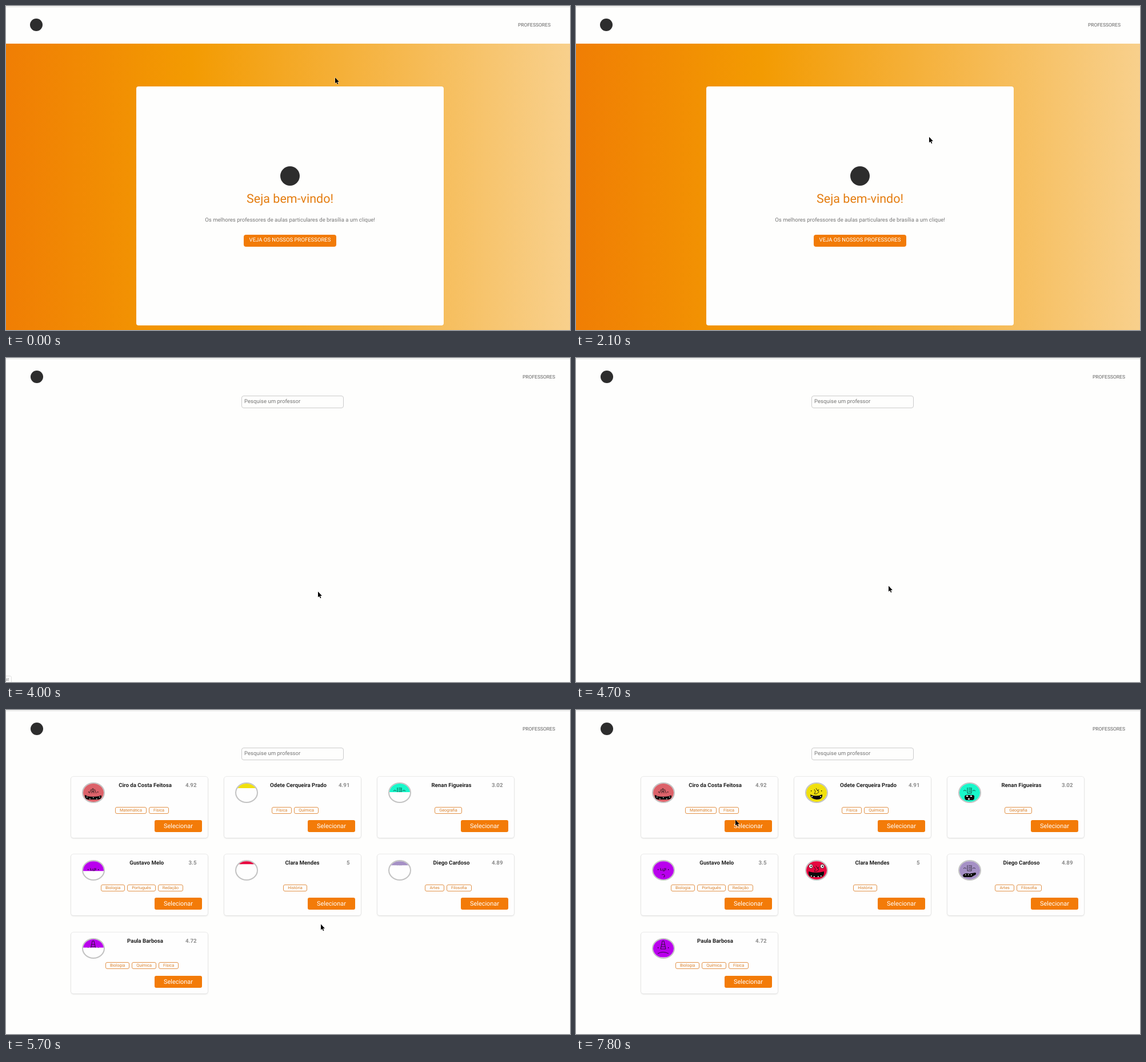
Write an HTML page that moves like this. It is 987 by 568 pixels and loops after 8000 ms.

```html
<!DOCTYPE html>
<html lang="pt-BR">
<head>
<meta charset="utf-8">
<title>Professores</title>
<style>
  html, body { margin: 0; width: 100%; height: 100%; overflow: hidden; }
  body {
    position: relative; background: #fefefd;
    font: 9.57px/12px Roboto, sans-serif; white-space: nowrap;
    text-rendering: geometricPrecision;
  }
  #home, #list, #cards { position: absolute; inset: 0; }
  #home, #list, #cards, #status, #cursor, #arrow, #hand, .avatar, .avatar svg {
    animation: 8s step-end infinite;
  }
  .abs, .nav, .logo, .card, .tags, .select, #cursor, #status { position: absolute; }

  .line { left: 0; right: 0; top: 1px; height: 1px; background: #dedede; }
  .logo { border-radius: 50%; background: #2d2d2d; }
  .small { width: 22px; height: 22px; top: 22px; }
  .nav { top: 28px; font-size: 8.5px; color: #606060; }

  #home { animation-name: home; }
  .sky {
    left: 0; right: 0; top: 66px; bottom: 0;
    background: linear-gradient(90deg, #f07e04, #f39b02 33%, #f8d08c);
  }
  .welcome {
    left: 228px; top: 141px; width: 538px; height: 419px; border-radius: 4px;
    background: #fefefd; box-shadow: 0 0 1px #c7822866; text-align: center;
  }
  .welcome .logo { left: 252px; top: 140px; width: 34px; height: 34px; }
  h1 {
    left: 0; right: 0; top: 183.5px; margin: 0;
    font: 400 21.5px/28px Roboto, sans-serif; color: #e47d10;
  }
  .lead { left: 0; right: 0; top: 229px; color: #777; }
  .go {
    left: 188px; top: 260px; width: 162px; border-radius: 4px;
    font-size: 9.53px; line-height: 20.5px; color: #fff; background: #f27b07;
  }

  #list { animation-name: list; background: #fefefd; }
  #cards { animation-name: cards; }
  .search {
    left: 411.5px; top: 66px; width: 173px; height: 20px; padding-left: 4.5px;
    border: 1px solid #cbcbcb; border-radius: 4px; line-height: 20px; color: #757575;
  }
  .card {
    width: 238.5px; height: 107px; border-radius: 4px; background: #fefefe;
    box-shadow: 0 0 0 .6px #dcdcdc, 0 1px 3px #0002;
  }
  .head {
    display: flex; justify-content: space-between; align-items: flex-start;
    padding: 10px 19px 0; font-size: 9.7px; line-height: 11px; font-weight: 700;
  }
  .name { color: #222; }
  .rating { color: #8c8c8c; }
  .avatar {
    width: 36px; height: 32px; border: 2px solid #c3c3c3; border-radius: 50%;
    overflow: hidden; background: #fefefe;
  }
  .avatar svg { display: block; animation-name: fill; }
  .tags {
    left: 4.75px; top: 52.6px; width: 100%;
    display: flex; justify-content: center; gap: 4px;
  }
  .tags span {
    padding: 0 7px; border: 1px solid #e2934a; border-radius: 3px;
    font-size: 7.3px; line-height: 10px; color: #d97f28;
  }
  .select {
    left: 146px; top: 76px; width: 83px; border-radius: 3px; text-align: center;
    font-size: 10.9px; line-height: 21px; color: #fff; background: #f37b08;
  }

  #status {
    left: -1px; bottom: -1px; width: 9px; height: 10px; overflow: hidden;
    border: 1px solid #d4d4d4; border-radius: 0 3px 0 0; background: #fefefe;
    font-size: 7.5px; line-height: 12px; text-indent: -1px; color: #555;
    animation-name: status;
  }
  #cursor { left: 0; top: 0; overflow: visible; animation-name: move; }
  #cursor path { stroke: #fff; stroke-width: .7; paint-order: stroke; }
  #arrow { animation-name: arrow; }
  #hand { animation-name: hand; }

  @keyframes home { 0% { opacity: 1 } 50%, 100% { opacity: 0 } }
  @keyframes list { 0% { opacity: 0 } 50%, 100% { opacity: 1 } }
  @keyframes cards { 0% { opacity: 0 } 61.25%, 100% { opacity: 1 } }
  @keyframes arrow { 0% { opacity: 1 } 36.25% { opacity: 0 } 50%, 100% { opacity: 1 } }
  @keyframes hand { 0% { opacity: 0 } 36.25% { opacity: 1 } 50%, 100% { opacity: 0 } }
  @keyframes status {
    0% { opacity: 0 } 40% { opacity: .7 } 43.75% { opacity: 1 }
    50% { opacity: .7 } 51.25% { opacity: .4 } 52.5%, 100% { opacity: 0 }
  }
  @keyframes load1 { 0% { width: 0; border-radius: 1px } 62.5%, 100% { width: 36px; border-radius: 50% } }
  @keyframes load2 { 0% { width: 0; border-radius: 1px } 68.75%, 100% { width: 36px; border-radius: 50% } }
  @keyframes load3 { 0% { width: 0; border-radius: 1px } 70%, 100% { width: 36px; border-radius: 50% } }
  @keyframes load4 { 0% { width: 0; border-radius: 1px } 71.25%, 100% { width: 36px; border-radius: 50% } }
  @keyframes fill {
    0% { clip-path: inset(0 0 calc(32px - var(--part)) 0) }
    73.75% { clip-path: inset(0 0 calc(16px - var(--part) / 2) 0) }
    75%, 100% { clip-path: inset(0) }
  }
  @keyframes move {
    0% { transform: translate(576px, 125px) }
    15% { transform: translate(551px, 113px) }
    16.25% { transform: translate(527px, 102px) }
    21.25% { transform: translate(534px, 108px) }
    22.5% { transform: translate(548px, 124px) }
    23.75% { transform: translate(568px, 150px) }
    25% { transform: translate(594px, 187px) }
    26.25% { transform: translate(618px, 229px) }
    27.5% { transform: translate(637px, 274px) }
    28.75% { transform: translate(644px, 318px) }
    30% { transform: translate(622px, 358px) }
    31.25% { transform: translate(583px, 386px) }
    32.5% { transform: translate(574px, 391px) }
    33.75% { transform: translate(568px, 396px) }
    35% { transform: translate(561px, 400px) }
    36.25% { transform: translate(555px, 404px) }
    37.5% { transform: translate(551px, 407px) }
    38.75% { transform: translate(548px, 408px) }
    40% { transform: translate(546px, 409px) }
    57.5% { transform: translate(546px, 405px) }
    58.75% { transform: translate(547px, 399px) }
    60% { transform: translate(548px, 393px) }
    61.25% { transform: translate(548px, 389px) }
    65% { transform: translate(547px, 384px) }
    66.25% { transform: translate(550px, 380px) }
    68.75% { transform: translate(551px, 377px) }
    70% { transform: translate(551px, 375px) }
    86.25% { transform: translate(545px, 392px) }
    87.5% { transform: translate(520px, 408px) }
    88.75% { transform: translate(473px, 403px) }
    90% { transform: translate(420px, 372px) }
    91.25% { transform: translate(370px, 328px) }
    92.5% { transform: translate(331px, 288px) }
    95% { transform: translate(306px, 246px) }
    96.25% { transform: translate(280px, 206px) }
    97.5%, 100% { transform: translate(279px, 192px) }
  }
</style>
</head>
<body>
<div id="home">
  <div class="abs line"></div>
  <div class="logo small" style="left:42px"></div>
  <div class="nav" style="right:34px">PROFESSORES</div>
  <div class="abs sky"></div>
  <div class="abs welcome">
    <div class="logo"></div>
    <h1 class="abs">Seja bem-vindo!</h1>
    <div class="abs lead">Os melhores professores de aulas particulares de brasília a um clique!</div>
    <div class="abs go">VEJA OS NOSSOS PROFESSORES</div>
  </div>
</div>

<div id="list">
  <div class="abs line"></div>
  <div class="logo small" style="left:43px"></div>
  <div class="nav" style="right:26px">PROFESSORES</div>
  <div class="abs search">Pesquise um professor</div>
  <div id="cards"></div>
</div>

<div id="status">st</div>
<svg id="cursor" width="10" height="14">
  <path id="arrow" d="M0 .5V10.6L2.3 8.5 4 12.2 5.4 11.6 3.8 8H6.9Z"/>
  <path id="hand" d="M.3 .3Q1.2-.6 1.9 .5V3.4L5 4Q6.3 4.3 6 6L5.4 9.5H1L-1 6.2Q-1.2 5 .3 5.6Z"/>
</svg>

<script>
  const line = (d, width = .8) => `<path d="${d}" fill="none" stroke="#111" stroke-width="${width}"/>`;
  const shape = (d, color = '#0b0b0b') => `<path d="${d}" fill="${color}"/>`;
  const teeth = d => shape(d, '#fff');
  const dots = (y, gap) => shape(`M${17 - gap} ${y}h1.3v1.5h-1.3zM${17 + gap} ${y}h1.3v1.5h-1.3z`);
  const brows = line('M7 13q2-3 5 0M23 13q2-3 5 0', .7);
  const peak = line('M11 17l3-7M15 17l1-8 2 0 1 8M20 10l3 7M15 14h4');
  const bulb = line('M14 10l2 4-2 4h4M17 8l3 5 2-3M18 18l4-3-2-4');
  const sheet = line('M14 7v10h7V7M16 8h4M16 11h4M16 14h4', .7);
  const grin = shape('M3 20Q5 20 7 22Q17 24 28 22Q31 20 32 21Q33 27 26 28H9Q2 27 3 20Z') +
    teeth('M6 23h1.5v1.2h-1.5zM11 26h1.5v1.2h-1.5zM17 24h1.5v1.2h-1.5zM23 26h1.5v1.2h-1.5zM28 23h1.5v1.2h-1.5z');
  const eye = (x, y) => `<circle cx="${x}" cy="${y}" r="3.4" fill="#fff" stroke="#111" stroke-width=".7"/>
    <circle cx="${x + .5}" cy="${y}" r="1.2"/>`;

  const faces = [
    dots(14, 8) + peak + grin,
    dots(12, 9) + bulb + shape('M7 19Q17 24 28 19Q29 28 18 28Q7 27 7 19Z') + teeth('M9 22h2v1.5h-2zM24 22h2v1.5h-2z'),
    brows + sheet + shape('M9 23Q9 20 13 20H23Q27 20 26 25Q26 29 22 29H13Q9 29 9 23Z') +
      teeth('M12 21h3v2h-3zM19 21h3v2h-3zM15 26h3v2h-3z'),
    dots(14, 9) + line('M13 12v4h2M17 13v4h3v-5M22 12v4M15 24q4-2 5 1t-2 3'),
    eye(8, 9) + eye(28, 9) + bulb + shape('M4 18Q17 22 31 18Q32 27 25 28H10Q3 27 4 18Z') +
      teeth('M8 25h1.5v2h-1.5zM13 26h1.5v2h-1.5zM20 26h1.5v2h-1.5zM25 25h1.5v2h-1.5z'),
    brows + sheet + shape('M6 24Q10 20 17 22L28 20Q31 23 26 25L21 28H8Q6 27 6 24Z') +
      teeth('M10 23h1.5v1.5h-1.5zM15 23h1.5v1.5h-1.5zM20 23h1.5v1.5h-1.5z'),
    dots(14, 9) + line('M13 17L16 3h3l3 14zM15 9h5M14 13h7M8 25q9-5 19 0')
  ];

  // name, rating, tags, face colour, loading group, part loaded first
  const teachers = [
    ['Ciro da Costa Feitosa', '4.92', 'Matemática Física', '#dc626a', 1, 32],
    ['Odete Cerqueira Prado', '4.91', 'Física Química', '#f0e00d', 2, 8],
    ['Renan Figueiras', '3.02', 'Geografia', '#18f7ca', 2, 15],
    ['Gustavo Melo', '3.5', 'Biologia Português Redação', '#b900ed', 3, 17],
    ['Clara Mendes', '5', 'História', '#e7063f', 4, 5],
    ['Diego Cardoso', '4.89', 'Artes Filosofia', '#a590c5', 4, 7],
    ['Paula Barbosa', '4.72', 'Biologia Química Física', '#b900ed', 3, 15]
  ];

  document.getElementById('cards').innerHTML = teachers.map(
    ([name, rating, tags, color, group, part], i) => `
    <div class="card" style="left:${114 + i % 3 * 268}px;top:${117 + Math.floor(i / 3) * 136.3}px">
      <div class="head">
        <div class="avatar" style="animation-name:load${group}">
          <svg width="36" height="32" style="--part:${part}px">
            <rect width="36" height="32" fill="${color}"/>${faces[i]}
          </svg>
        </div>
        <span class="name">${name}</span><span class="rating">${rating}</span>
      </div>
      <div class="tags">${tags.split(' ').map(tag => `<span>${tag}</span>`).join('')}</div>
      <div class="select">Selecionar</div>
    </div>`).join('');
</script>
</body>
</html>
```
